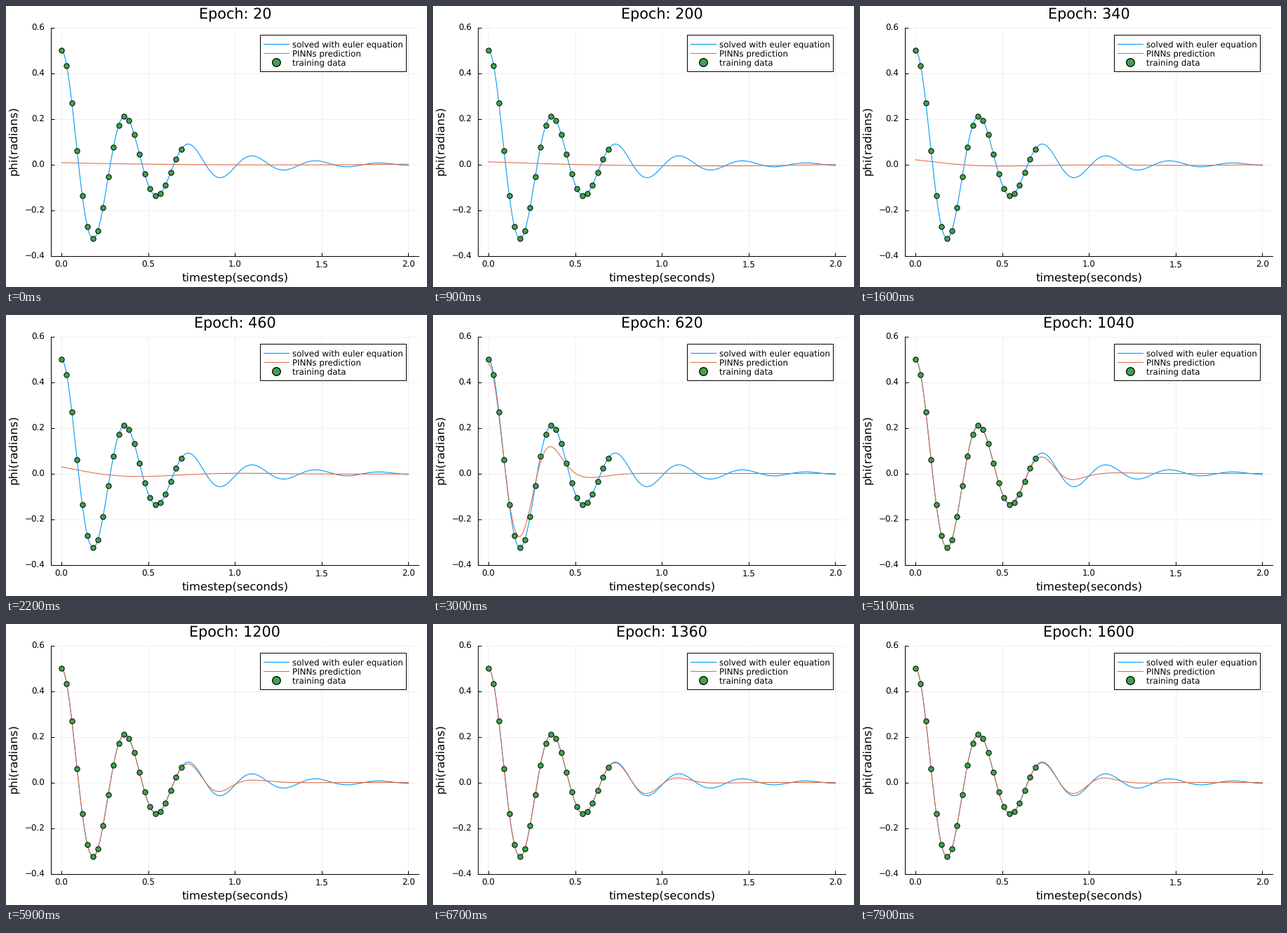
A matplotlib script for the animation above (8000 ms loop, 600 by 400 pixels).

```python
import matplotlib.pyplot as plt
import numpy as np
from matplotlib.animation import FuncAnimation
from matplotlib.patches import Rectangle
from matplotlib.transforms import IdentityTransform

W, H, DPI = 600, 400, 100
PT = 72 / DPI  # points per pixel
FRAMES, STEP_MS, EPOCHS = 80, 100, 20
BLUE, ORANGE, GREEN = "#009AFA", "#E36F47", "#3EA44E"
T = np.linspace(0, 2, 501)


def pendulum(t, rate=2.354, omega=np.pi / 0.183, lead=0.0008):
    t = t + lead
    return 0.5 * np.exp(-rate * t) * (np.cos(omega * t) + rate / omega * np.sin(omega * t))


def ramp(n, start, end):
    return np.clip((n - start) / (end - start), 0, 1)


def mix(a, b, u):
    return a + (b - a) * u


def bowl(n):
    """Nearly flat first guess that slowly bends."""
    u = ramp(n, 0, 9)
    return mix(-0.002, -0.0065, u) + mix(0.0095, 0.018, u) * (T / 1.25 - 1) ** 2


def slow_swing():
    return 0.033 * np.exp(-2.2 * T) * np.cos(5.2 * T + 0.4) - 0.002


def learned(n):
    """The pendulum up to a moving front; past it the swing fades and lags."""
    front = np.interp(n, [22, 27, 39, 51, 67], [0, 0.28, 0.72, 0.9, 1.11])
    gate = 1 / (1 + np.exp((T - front) / 0.12))
    lag = 0.025 * np.logaddexp(0, (T - front - 0.05) / 0.05)
    return gate * pendulum(T - lag)


def prediction(n):
    early = mix(bowl(n), slow_swing(), ramp(n, 9, 22))
    return mix(early, learned(n), ramp(n, 22, 27))


plt.rcParams.update({"font.family": "DejaVu Sans", "text.hinting": "none"})
fig = plt.figure(figsize=(W / DPI, H / DPI), dpi=DPI, facecolor="white")
LEFT, RIGHT, TOP, BOTTOM = 64.2, 588.3, 30.55, 355.55
ax = fig.add_axes([LEFT / W, 1 - BOTTOM / H, (RIGHT - LEFT) / W, (BOTTOM - TOP) / H])
ax.set(xlim=(-0.06, 2.06), ylim=(-0.4, 0.6))
ax.set_xticks(np.arange(0, 2.1, 0.5), labels=[])
ax.set_yticks(np.arange(-0.4, 0.7, 0.2), labels=[])
ax.tick_params(direction="in", length=5 * PT, width=PT)
ax.grid(color="#f0f0f0", lw=PT)
ax.set_axisbelow(True)
ax.spines[["top", "right"]].set_visible(False)
ax.spines[["left", "bottom"]].set_linewidth(PT)

# Pixel-space layer for lettering and the legend.
page = fig.add_axes([0, 0, 1, 1], facecolor="none")
page.set(xlim=(0, W), ylim=(H, 0))
page.axis("off")


def label(x, y, text, size=11.9, ha="center", **kw):
    return page.text(x, H - y, text, fontsize=size * PT, ha=ha, va="baseline",
                     transform=IdentityTransform(), **kw)


def dots(axes, x, y, size, edge=1):
    axes.plot(x, y, "o", ms=size * PT, mfc=GREEN, mec="black", mew=edge * PT,
              clip_on=False, snap=False)


for v in np.arange(0, 2.1, 0.5):
    label(79 + 247.2 * v, 372, f"{v:.1f}")
for i in range(-2, 4):
    label(55.5, 225.5 - 65 * i + 4.3, f"{i / 5:.1f}".replace("-", "−"), ha="right")
label(326.3, 391.5, "timestep(seconds)", 16.4)
label(15, 192, "phi(radians)", 16.4, rotation=90, rotation_mode="anchor")
title = label(326.3, 18.7, "", 20.8)

ax.plot(T, pendulum(T), color=BLUE, lw=1.1 * PT)
fit, = ax.plot([], [], color=ORANGE, lw=1.1 * PT)
samples = 0.03 * np.arange(24)
dots(ax, samples, pendulum(samples), 7.3)

page.add_patch(Rectangle((362, 40.6), 208, 52, fc="white", ec="black", lw=PT))
entries = ("solved with euler equation", BLUE), ("PINNs prediction", ORANGE), ("training data", None)
for row, (name, color) in enumerate(entries):
    y = 54 + 13 * row
    label(408, y + 4.2, name, ha="left")
    if color:
        page.plot([367, 402.5], [y, y], color=color, lw=1.1 * PT)
    else:
        dots(page, [385.3], [y + 0.4], 11.5, 1.3)


def draw(n):
    title.set_text(f"Epoch: {EPOCHS * (n + 1)}")
    fit.set_data(T, prediction(n))
    return title, fit


anim = FuncAnimation(fig, draw, frames=FRAMES, interval=STEP_MS, repeat=True, repeat_delay=0)
plt.show()
```
